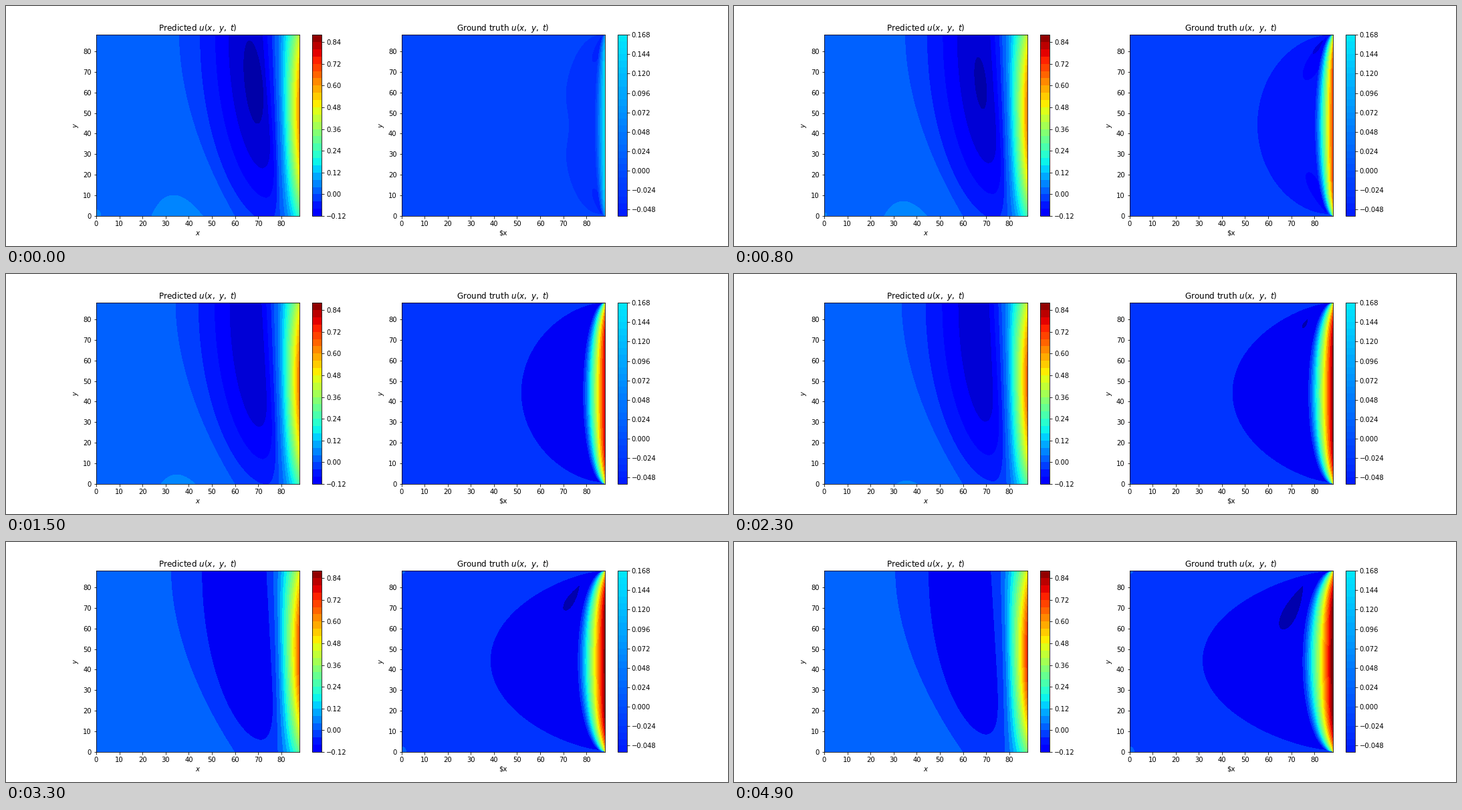
These frames come from a looping animation (1080x360 px, 5000 ms). A matplotlib script:

```python
import numpy as np
import matplotlib.pyplot as plt
from matplotlib.animation import FuncAnimation
from matplotlib.colors import Normalize

FRAMES, INTERVAL = 50, 100
SIZE = 88

plt.rcParams.update({"font.family": "DejaVu Sans", "font.size": 10,
                     "figure.subplot.bottom": 0.125})
jet = plt.get_cmap("jet")
norm = Normalize(-0.222, 0.878)
ROWS = np.linspace(0, SIZE, 177)
X, Y = np.meshgrid(np.linspace(72, SIZE, 129), ROWS)
MERGED = (0, 0, 0.965)

fig, axes = plt.subplots(1, 2, figsize=(15, 5), dpi=72)
left, right = axes


def setup(ax, title, xlabel, levels, ticks):
    scale = ax.contourf([[0, 1], [0, 1]], levels=levels, cmap=jet, norm=norm)
    fig.colorbar(scale, ax=ax, ticks=ticks)
    scale.set_visible(False)
    ax.set(xlim=(0, SIZE), ylim=(0, SIZE), title=title + r" $u(x,\ y,\ t)$",
           xlabel=xlabel, ylabel="$y$")
    ax.set_xticks(range(0, SIZE, 10))
    ax.set_yticks(range(0, SIZE, 10))
    ax.set_autoscale_on(False)


setup(left, "Predicted", "$x$", np.arange(-3, 23) * 0.04, np.arange(-1, 8) * 0.12)
setup(right, "Ground truth", "$x", np.arange(-7, 22) * 0.008, np.arange(-2, 8) * 0.024)

drawn = []


def tint(value):
    return jet(norm(value))


def fill(ax, x, y, color):
    drawn.extend(ax.fill(x, y, color=color, lw=0, antialiased=False, zorder=1))


def fan(ax, u, levels):
    drawn.append(ax.contourf(X, Y, u, levels=levels, cmap=jet, norm=norm, zorder=1))


def power(v, p):
    return np.sign(v) * np.abs(v) ** p


def corner(ax, y, w, h, color):
    a = np.linspace(0, 2 * np.pi, 40)
    fill(ax, w * np.cos(a), y + h * np.sin(a), color)


def basin(ax, color, low, x_low, x_left, x_right_low, x_right_top):
    """Valley open at the top edge and rounded off at height low."""
    y = np.linspace(low, SIZE, 120)
    h = (y - low) / (SIZE - low)
    a = x_low + (x_left - x_low) * (1 - (1 - h) ** 2) ** 0.6
    wall = x_right_low + (x_right_top - x_right_low) * h
    b = x_low + (wall - x_low) * np.sqrt(1 - (1 - h) ** 10)
    fill(ax, np.r_[a, b[::-1]], np.r_[y, y[::-1]], color)


def drop(ax, color, tip, end, width):
    """Teardrop with its point at tip and its round side at end."""
    tip, end = np.array(tip), np.array(end)
    axis = end - tip
    nx, ny = np.array([-axis[1], axis[0]]) / np.hypot(*axis)
    a = np.linspace(0, 2 * np.pi, 80)
    s = (1 - np.cos(a)) / 2
    w = width * np.sin(a) * np.abs(np.sin(a / 2))
    fill(ax, tip[0] + axis[0] * s + nx * w, tip[1] + axis[1] * s + ny * w, color)


def draw_predicted(t):
    early = t < 2.7
    step = 0.04 if early else 0.05
    left.set_facecolor(tint(step / 2))

    zero_low, zero_top = 79.6 - 0.28 * t, 77.2 - 0.17 * t
    zero = zero_low + (zero_top - zero_low) * ROWS / SIZE
    x_top = 36 - 1.05 * t
    edge = x_top + (60.2 - x_top) * (1 - ROWS / SIZE) ** 1.85
    fill(left, np.r_[edge, zero[::-1]], np.r_[ROWS, ROWS[::-1]], tint(-step / 2))

    if early:
        basin(left, tint(-0.06), -3 + 1.9 * t, 74.5 - 0.6 * t, 45 - 0.45 * t,
              78.8 - 0.4 * t, 75.8 - 0.3 * t)
        basin(left, tint(-0.10), 9 + 2.2 * t, 73.5 - t, 51.6 - 0.2 * t,
              77.6 - 0.6 * t, 73.8 - 0.3 * t)
        basin(left, tint(-0.14), 23.3 + 3.1 * t, 71.8 - 0.95 * t, 57.3 + 0.35 * t,
              76 - 1.1 * t, 71.8 - 0.3 * t)
        if t < 1.3:
            r = np.sqrt(1 - t / 1.3)
            a = np.linspace(0, 2 * np.pi, 80)
            dy = 20 * r * np.sin(a)
            fill(left, 68 - 0.5 * t - 0.085 * dy + 3.8 * r * np.cos(a),
                 65 - 0.6 * t + dy, tint(-0.18))
        height = 10 - 3.7 * t
        if height > 0:
            s = np.linspace(-1, 1, 60)
            bump = 1 - s ** 2
            fill(left, 35 + 0.3 * t + 11 * np.sqrt(height / 10) * s - 0.16 * height * bump,
                 height * bump, tint(0.06))
        if t < 1.8:
            corner(left, 0, 2 * (1 - t / 1.8), 3 * (1 - t / 1.8), tint(0.06))
    else:
        d = t - 3.3
        basin(left, MERGED, 6 + 1.62 * d, 71.2 - 0.75 * d, 45.9 - 0.4 * d,
              77.2 - 0.7 * d, 73.4 - 0.95 * d)

    low, mid, top = 0.24 + 0.018 * t, 0.62 + 0.025 * t, 0.42 + 0.01 * t
    z = Y / (SIZE / 2) - 1
    peak = mid + (top - low) / 2 * z + ((top + low) / 2 - mid) * z ** 2
    x0 = zero_low + (zero_top - zero_low) * Y / SIZE
    fan(left, peak * power((X - x0) / (SIZE - x0), 1.3), np.arange(0, 25) * step)


def draw_truth(t):
    step = 0.02 if t < 0.15 else 0.03 if t < 0.35 else 0.04 if t < 1.25 else 0.05
    right.set_facecolor(tint(-step / 2))

    if step < 0.03:
        x_min = 69.8 - 30 * t
    elif step < 0.05:
        x_min = np.interp(t, [0.2, 0.4, 0.8, 1.2], [66, 62.5, 55.5, 51])
    else:
        x_min = np.interp(t, [1.3, 1.5, 2.3, 3.3, 4, 4.9],
                          [54, 52, 44.7, 38.7, 35.5, 31.8])
    y = np.linspace(1, 87.8, 200)
    z = (y - 44.4) / 43.4
    bulge = np.clip(1 - z ** 2, 0, 1) ** min(0.68, 0.46 + 0.09 * t)
    x = 87 + (x_min - 87) * bulge
    x += max(0, 1 - t / 0.3) * 2.8 * np.exp(-((y - 44) / 12) ** 2)
    fill(right, np.r_[x, SIZE, SIZE], np.r_[y, y[-1], y[0]],
         MERGED if step == 0.05 else tint(-1.5 * step))

    if step < 0.05:
        k = t / 0.8
        drop(right, tint(-2.5 * step), (86.5 - 1.5 * k, 87 - 0.5 * k),
             (83.2 - 7 * k, 75 - 8.7 * k), 1.7 + 2.1 * k)
        drop(right, tint(-2.5 * step), (86.5 - 1.5 * k, 1 + k),
             (83.2 - 6 * k, 13 + 8 * k), 1.7 + 1.3 * k)
        if t > 0.55:
            drop(right, tint(-3.5 * step), (83.5, 85), (79.6, 79), 0.9)
    elif t > 2.15:
        def at(*values):
            return np.interp(t, [2.3, 3.3, 4, 4.9], values)
        drop(right, tint(-0.175), (at(77, 76.8, 76, 75), at(79.8, 80.4, 80.4, 80.5)),
             (at(75, 70.6, 68.6, 66), at(76, 69, 65, 59.8)), at(0.8, 2.2, 3, 3.9))
        grow = min(1, (t - 1.7) / 1.6)
        corner(right, 0, 2 * grow, 2.6 * grow, tint(0.025))
        corner(right, SIZE, 1.6 * grow, 1.3 * grow, tint(0.025))

    peak = np.interp(t, [0, 0.3, 0.8, 1.5, 2.3, 4.9],
                     [0.17, 0.46, 0.7, 0.8, 0.86, 0.9])
    width = np.interp(t, [0, 0.8, 1.5, 2.3, 3.3, 4, 4.9],
                      [4.2, 7.6, 9.3, 10.5, 11.6, 12.3, 13])
    z = Y / (SIZE / 2) - 1
    span = width * np.sqrt(np.clip(1 - z ** 2, 1e-4, 1))
    u = (peak * (1 - 0.5 * z ** 6) + step) * power(1 - (SIZE - X) / span, 1.2) - step
    fan(right, u, np.arange(-1, 1 / step) * step)


def update(i):
    while drawn:
        drawn.pop().remove()
    t = i * INTERVAL / 1000
    draw_predicted(t)
    draw_truth(t)
    return []


anim = FuncAnimation(fig, update, frames=FRAMES, interval=INTERVAL,
                     init_func=lambda: [], repeat=True, repeat_delay=0)
plt.show()
```
